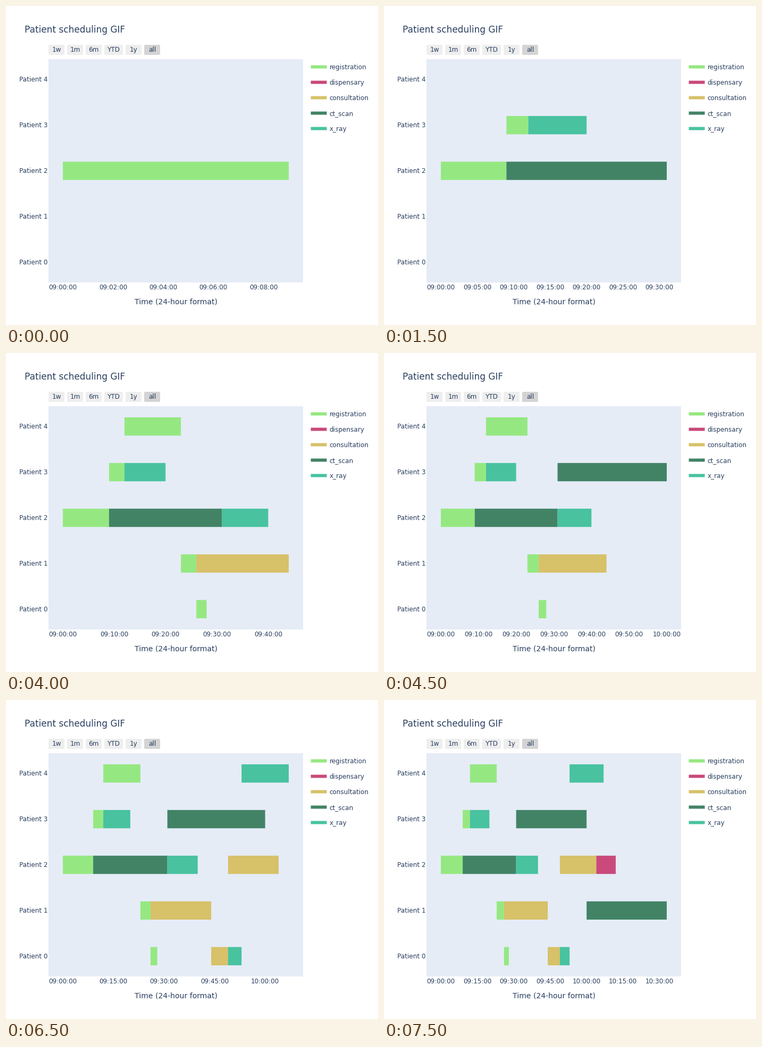
A matplotlib script that plays this animation: 700 by 600 pixels, repeating every 8000 ms.

```python
import matplotlib.pyplot as plt
from matplotlib.animation import FuncAnimation
from matplotlib.patches import FancyBboxPatch, Rectangle

W, H, DPI = 700, 600, 100
INK = "#2a3f5f"
LEFT, TOP, PLOT_W, PLOT_H = 80, 100, 479, 420
X0, X1 = 106.95, 532.05       # pixel positions of first start and last finish
ROW_H = 85.909
STEP_MS = 500

COLORS = {
    "registration": "#95e881",
    "dispensary": "#c94a7a",
    "consultation": "#d7c169",
    "ct_scan": "#428366",
    "x_ray": "#48c29f",
}

# (patient, task, start minute, end minute), one added per step
TASKS = [
    (2, "registration", 0, 9),
    (2, "ct_scan", 9, 31),
    (3, "registration", 9, 12),
    (3, "x_ray", 12, 20),
    (4, "registration", 12, 23),
    (1, "registration", 23, 26),
    (0, "registration", 26, 28),
    (1, "consultation", 26, 44),
    (2, "x_ray", 31, 40),
    (3, "ct_scan", 31, 60),
    (0, "consultation", 44, 49),
    (0, "x_ray", 49, 53),
    (2, "consultation", 49, 64),
    (4, "x_ray", 53, 67),
    (1, "ct_scan", 60, 93),
    (2, "dispensary", 64, 72),
]

plt.rcParams["font.family"] = "DejaVu Sans"
fig = plt.figure(figsize=(W / DPI, H / DPI), dpi=DPI, facecolor="white")
ax = fig.add_axes([0, 0, 1, 1])
ax.set_xlim(0, W)
ax.set_ylim(H, 0)
ax.axis("off")


def rect(x, y, w, h, color):
    return ax.add_patch(Rectangle((x, y), w, h, facecolor=color,
                                  linewidth=0, snap=False))


def label(x, y, text, px=12, ha="left"):
    return ax.text(x, y, text, fontsize=px * 72 / DPI, color=INK,
                   ha=ha, va="baseline")


def row_y(patient):
    return 310 - (patient - 2) * ROW_H


def tick_step(span):
    """Smallest round step, in minutes, that keeps labels about 80 px apart."""
    rough = span * PLOT_W / (X1 - X0) / (PLOT_W / 80 + 1)
    return next(s for s in (1, 2, 5, 10, 15, 30, 60) if s >= rough - 0.05)


def draw_static():
    label(35, 50, "Patient scheduling GIF", 17)
    label(319.5, 561, "Time (24-hour format)", 14, "center")
    rect(LEFT, TOP, PLOT_W, PLOT_H, "#e5ecf6")

    x = LEFT
    for name in ("1w", "1m", "6m", "YTD", "1y", "all"):
        w = 35 if name == "YTD" else 30
        ax.add_patch(FancyBboxPatch(
            (x, 73), w, 19, boxstyle="round,pad=0,rounding_size=2",
            facecolor="#d4d4d4" if name == "all" else "#eeeeee", linewidth=0))
        label(x + w / 2, 86, name, ha="center")
        x += w + 5

    for i, (name, color) in enumerate(COLORS.items()):
        y = 114.5 + 29 * i
        rect(573.58, y - 3, 30, 6, color)
        label(608.58, y + 4.68, name)

    for p in range(5):
        label(25.2, row_y(p) + 4.2, f"Patient {p}")


draw_static()
moving = []


def update(i):
    while moving:
        moving.pop().remove()
    shown = TASKS[:i + 1]
    span = max(end for *_, end in shown)
    scale = (X1 - X0) / span
    for patient, task, start, end in shown:
        moving.append(rect(X0 + start * scale, row_y(patient) - 0.2 * ROW_H,
                           (end - start) * scale, 0.4 * ROW_H, COLORS[task]))
    for m in range(0, span + 1, tick_step(span)):
        clock = f"{9 + m // 60:02d}:{m % 60:02d}:00"
        moving.append(label(X0 + m * scale, 533, clock, ha="center"))
    return moving


anim = FuncAnimation(fig, update, frames=len(TASKS), interval=STEP_MS,
                     repeat=True, repeat_delay=0, blit=False)
plt.show()
```
